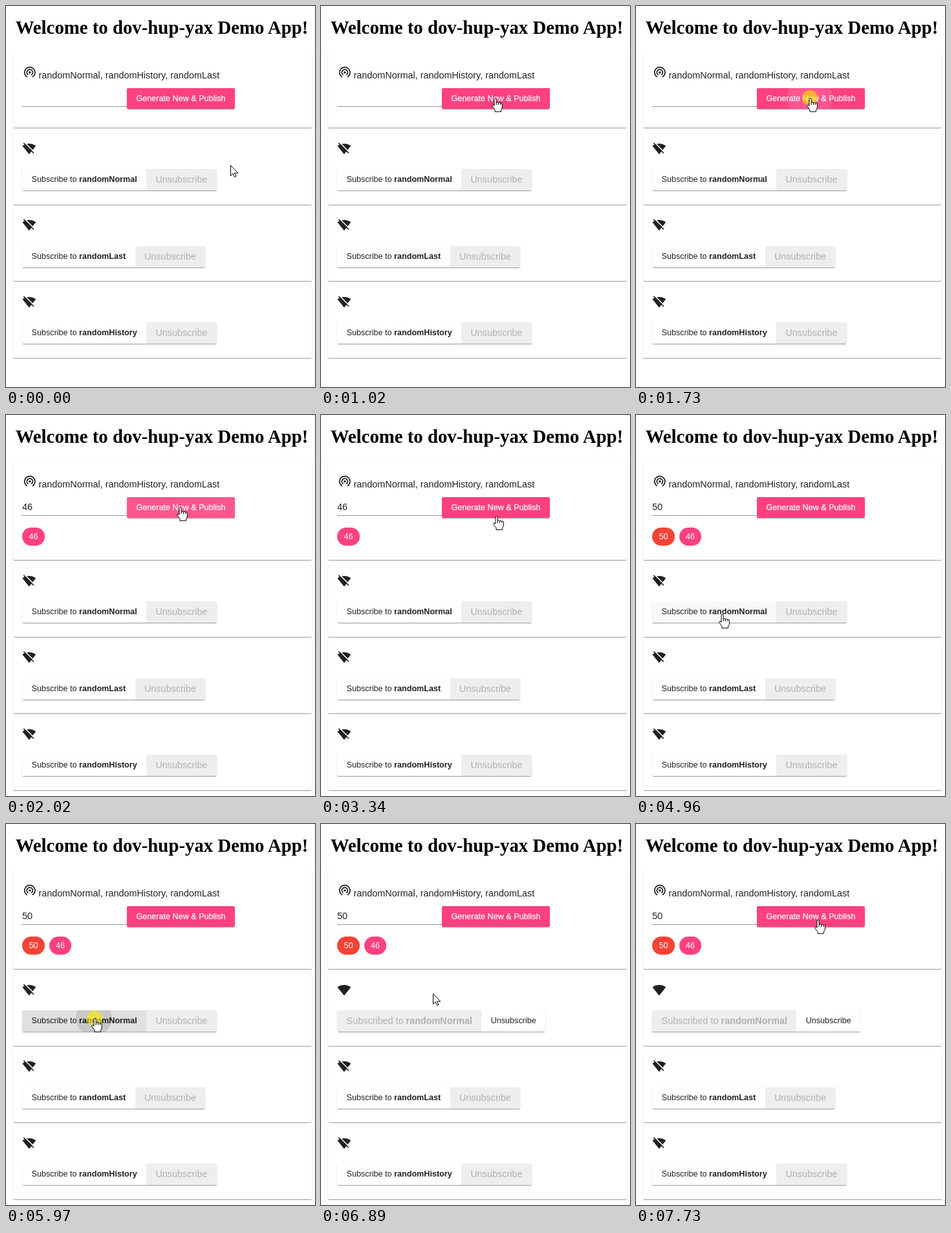
Write an HTML page that moves like this. It is 478 px wide and 589 px high and loops after 8000 ms.

```html
<!DOCTYPE html>
<html lang="en">
<head>
<meta charset="utf-8">
<title>Demo App</title>
<style>
html, body { margin: 0; width: 100%; height: 100%; overflow: hidden; background: #fff; }
body { position: relative; font: 14.4px/17px "Liberation Sans", Arial, sans-serif; color: rgba(0,0,0,.87); white-space: nowrap; }
body > *, #rows, .row, .row > *, #cursor > * { position: absolute; }
h1 { left: 10px; width: 462px; top: 17px; margin: 0; text-align: center; color: #000;
  font: bold 28.8px/33px "Liberation Serif", "Times New Roman", serif; }
.card { left: 11px; width: 462px; height: 114px; background: #fff; border-radius: 2px; }
.card, .group, #publish {
  box-shadow: 0 1.8px .9px -.9px rgba(0,0,0,.2), 0 .9px .9px rgba(0,0,0,.14), 0 .9px 2.7px rgba(0,0,0,.12); }
.icon { left: 25px; width: 21.6px; height: 21.6px; fill: #212121; }
.icon line { stroke: #212121; stroke-width: 1.8; }
.icon .gap { stroke: #fff; }
.icon .wave { fill: none; stroke: #212121; stroke-width: 2; stroke-dasharray: 300 60; }
#topics { left: 50.5px; top: 99px; }
#value { left: 25px; top: 134px; }
#line { left: 25px; top: 155px; width: 162px; height: 1px; background: #949494; }
#publish, .chip { background: #ff4081; color: #fff; font-size: 12.6px; text-align: center; }
#publish { left: 187px; top: 127px; width: 167px; height: 32px; border-radius: 2px; line-height: 32px;
  -webkit-text-stroke: .25px #fff; }
.chip { top: 174px; width: 35px; height: 28px; border-radius: 14px; line-height: 28px; }
#rows, .row { left: 0; top: 0; }
.group { left: 25.2px; top: 59.2px; height: 33px; display: flex; border-radius: 2px; overflow: hidden; line-height: 33px; }
.group span { padding: 0 14.4px; background-color: #fff; font-size: 12.6px; }
.group .off { background: #eee; color: rgba(0,0,0,.26); font-size: 14.4px; }
.group i { font-style: normal; }
#spot { width: 24px; height: 24px; margin: -12px; border-radius: 50%; background: rgba(255,235,0,.6); }
#cursor { left: 0; top: 0; }
#cursor path { fill: #fff; stroke: #000; stroke-linejoin: round; }
#cursor svg { overflow: visible; }
</style>
</head>
<body>
<h1>Welcome to dov-hup-yax Demo App!</h1>
<div class="card" id="top" style="top:70px"></div>
<svg class="icon" style="left:25.6px;top:91px" viewBox="0 0 24 24">
  <circle cx="12" cy="13" r="2"/>
  <g transform="rotate(120 12 13)">
    <circle class="wave" cx="12" cy="13" r="5" pathLength="360"/>
    <circle class="wave" cx="12" cy="13" r="9" pathLength="360"/>
  </g>
</svg>
<div id="topics">randomNormal, randomHistory, randomLast</div>
<div id="value"></div>
<div id="line"></div>
<div id="publish">Generate New &amp; Publish</div>
<div class="chip" id="chipA" style="left:25px"></div>
<div class="chip" id="chipB" style="left:67px;width:34px">46</div>
<div id="rows"></div>
<div id="spot"></div>
<div id="cursor">
  <svg id="arrow" width="12" height="19"><path d="M.5.5V16.5L4.2 13 6.6 18.4 8.9 17.4 6.5 12.2H11.7Z"/></svg>
  <svg id="hand" width="17" height="22" style="left:-5px"><path d="M4 12.3V2.2a1.6 1.6 0 0 1 3.2 0V7.5q2-1.5 3.4.3 2-1.2 3.2.4 2.6-.6 2.6 1.4V14q0 2.4-1.9 4.8v2.6H5v-2.9L1 13.3q-1-2 1-2.6ZM7.2 7.5V11M10.6 7.8V11M13.8 8.2V11"/></svg>
</div>
<script>
const LOOP = 8000, HOVER = 4940, REACT = 150;

// ripple: when the ink starts; the page reacts REACT ms later
const presses = [
  { down: 1570, ripple: 1720, end: 2250 },
  { down: 3870, ripple: 4050, end: 4350 },
  { down: 5970, ripple: 5970, end: 6120 }
];
// lift bows the way upwards
const moves = [
  { from: 230, to: 790, steps: 8, x: 265, y: 142, lift: 80 },
  { from: 940, to: 1020, steps: 2, x: 269, y: 142, lift: 0 },
  { from: 3340, to: 3630, steps: 5, x: 273, y: 136, lift: -17 },
  { from: 4590, to: 5030, steps: 7, x: 133, y: 309, lift: 0 },
  { from: 5200, to: 5270, steps: 2, x: 137, y: 300, lift: 0 },
  { from: 6890, to: 7640, steps: 11, x: 281, y: 148, lift: 0 }
];

const $ = id => document.getElementById(id);
const show = (el, on) => el.style.visibility = on ? "visible" : "hidden";
const clamp = v => Math.min(1, Math.max(0, v));
const inside = (x, y, l, t, r, b) => x >= l && x < r && y >= t && y < b;

function pointer(t) {
  let x = 347, y = 246;
  for (const m of moves) {
    if (t < m.from) break;
    const step = Math.floor((t - m.from) / (m.to - m.from) * (m.steps - 1)) + 1;
    const e = 1 - (1 - clamp(step / m.steps)) ** 3;
    x += (m.x - x) * e;
    y += (m.y - y) * e - m.lift * Math.sin(Math.PI * e);
  }
  return [Math.round(x), Math.round(y)];
}

const ripple = (x, y, r, color) =>
  `radial-gradient(circle at ${x}px ${y}px, ${color} ${r - .5}px, transparent ${r + .5}px)`;

$("rows").innerHTML = ["Normal", "Last", "History"].map((name, i) => `
  <div class="row" style="top:${193 + 118.4 * i}px">
    <div class="card"></div>
    <svg class="icon" style="top:17px" viewBox="0 0 24 24">
      <path d="M12 21.5L.4 7C.8 6.7 5.3 3 12 3s11.2 3.7 11.6 4z"/>
      <g><line class="gap" x1="2" y1="-1.1" x2="22" y2="18.9"/><line x1="2.6" y1="2.1" x2="19.9" y2="19.4"/></g>
    </svg>
    <div class="group"><span><i>Subscribe</i> to <b>random${name}</b></span><span class="off">Unsubscribe</span></div>
  </div>`).join("");
const [sub, unsub] = document.querySelectorAll(".row span");
const slash = document.querySelector(".row g");

function draw(t) {
  const [x, y] = pointer(t);
  const stage = presses.filter(p => t >= p.ripple + REACT).length;
  const filled = stage > 0, second = stage > 1, done = stage > 2;
  const press = presses.find(p => t >= p.down && t < p.end);
  const radius = press && t >= press.ripple ? 27 + .7 * (t - press.ripple) : 0;
  const onPublish = inside(x, y, 187, 127, 354, 159);
  const onSub = !done && inside(x, y, 25, 288, 217, 321);

  $("top").style.height = (filled ? 154 : 118) + "px";
  $("rows").style.top = (filled ? 36 : 0) + "px";
  $("value").textContent = $("chipA").textContent = second ? 50 : filled ? 46 : "";
  $("chipA").style.backgroundColor = second ? "#f44336" : "#ff4081";
  show($("chipA"), filled);
  show($("chipB"), second);

  $("publish").style.backgroundImage = onPublish && radius
    ? ripple(x - 187, y - 127, radius, "rgba(255,255,255,.11)") : "none";
  const shade = `rgba(0,0,0,${.12 * clamp((t - HOVER) / 100)})`;
  sub.style.backgroundImage = onSub
    ? `${ripple(x - 26, y - 288, radius, "rgba(0,0,0,.11)")}, linear-gradient(${shade}, ${shade})` : "none";
  sub.className = done ? "off" : "";
  unsub.className = done ? "" : "off";
  sub.firstChild.textContent = done ? "Subscribed" : "Subscribe";
  show(slash, !done);

  show($("spot"), press && t < press.ripple + REACT);
  $("spot").style.left = x + "px";
  $("spot").style.top = y + "px";
  $("cursor").style.transform = `translate(${x}px, ${y}px)`;
  show($("hand"), onPublish || onSub);
  show($("arrow"), !onPublish && !onSub);
}

const start = performance.now();
function tick() {
  draw((performance.now() - start) % LOOP);
  requestAnimationFrame(tick);
}
tick();
</script>
</body>
</html>
```
